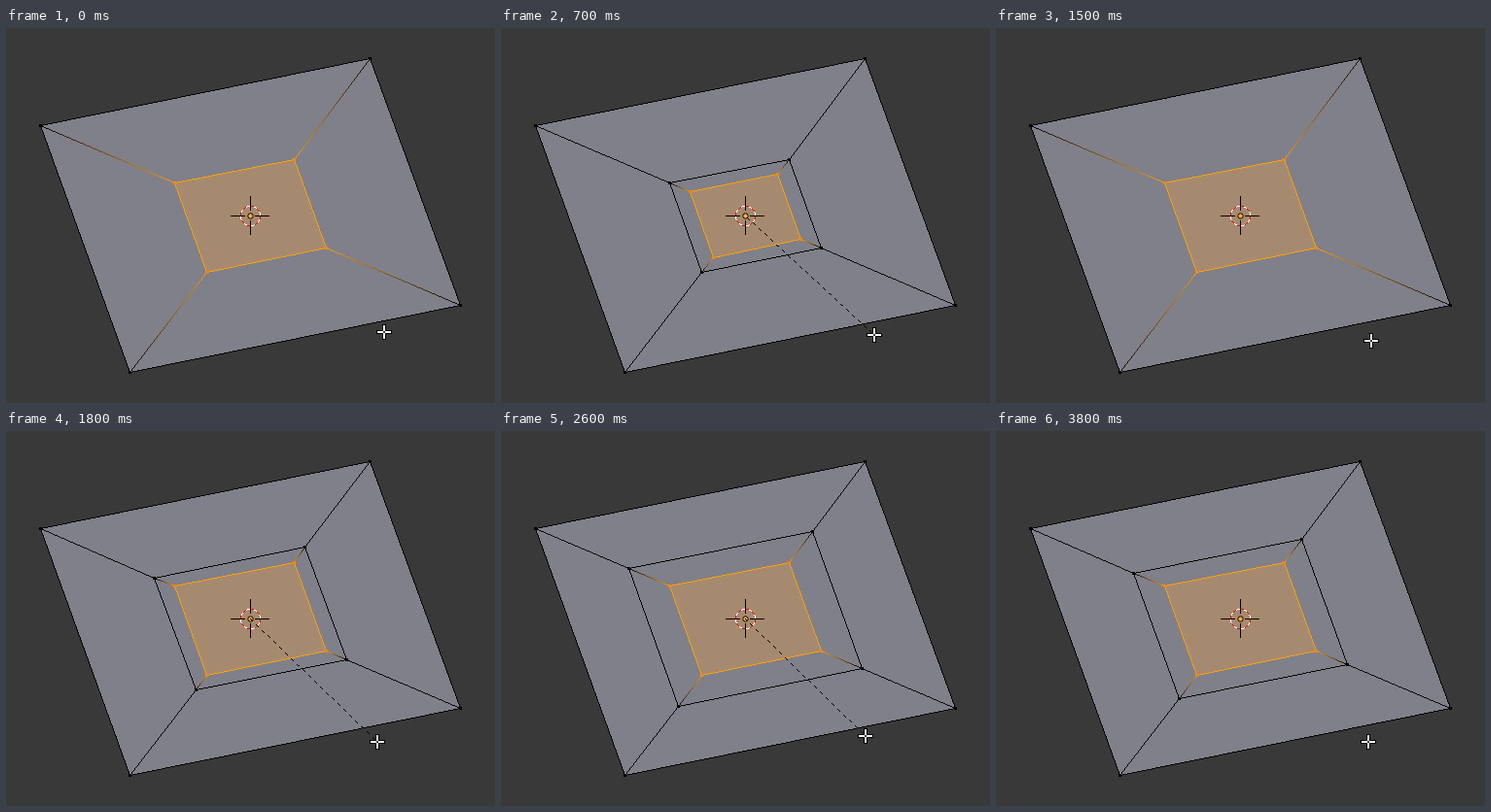
An HTML page with a canvas for the animation above (3900 ms loop, 503 by 386 pixels).

```html
<!DOCTYPE html>
<html lang="en">
<head>
<meta charset="utf-8">
<title>Inset and outset</title>
<style>
  html, body { margin: 0; width: 100%; height: 100%; overflow: hidden; background: #393939; }
  canvas { display: block; }
</style>
</head>
<body>
<canvas id="stage" width="503" height="386"></canvas>
<script>
const ctx = document.getElementById('stage').getContext('2d');
const STEP = 100, STEPS = 39;
const FACE = 0.361;
const CENTER = [251, 193];
const CORNERS = [[-216, -93], [123.3, -161.7], [216, 92], [-123.6, 161]];
const BLACK = [0, 0, 0], EDGE = [255, 160, 0], VERTEX = [255, 133, 0];

// Turning points of the outset drag: step, ring scale.
const TURNS = [[16, FACE], [19, 0.488], [21.5, 0.326], [27, 0.577], [31.5, 0.469], [35, 0.507]];

const mix = (a, b, k) => a.map((v, i) => v + (b[i] - v) * k);
const ease = k => (1 - Math.cos(Math.PI * Math.min(1, k))) / 2;

const insetScale = step => FACE - 0.21 * (1 - (1 - (step - 4) / 9) ** 1.5);

function outsetScale(step) {
  const found = TURNS.findIndex(turn => turn[0] > step);
  const i = found < 0 ? TURNS.length - 1 : found;
  const [t0, a] = TURNS[i - 1], [t1, b] = TURNS[i];
  return a + (b - a) * ease((step - t0) / (t1 - t0));
}

// While dragging, the mouse moves along a line in proportion to the scale.
const insetMouse = s => [384 + 67 * (s - 0.263), 316 + 33 * (s - 0.263)];
const outsetMouse = s => [382 - 69 * (s - 0.4535), 320 - 59 * (s - 0.4535)];

function stateAt(step) {
  const idle = { mid: 1, selected: FACE, dragging: false };
  if (step < 4) {
    return { ...idle, mouse: mix([389, 313], insetMouse(FACE), step / 4) };
  }
  if (step < 13) {
    const s = insetScale(step);
    return { mid: FACE, selected: s, mouse: insetMouse(s), dragging: true };
  }
  if (step < 16) {
    return { ...idle, mouse: mix(insetMouse(insetScale(12)), outsetMouse(FACE), (step - 12) / 4) };
  }
  const s = outsetScale(step);
  const dragging = step < 36;
  const mouse = mix(outsetMouse(s), [383, 320], dragging ? 0 : (step - 36) / 2);
  return { mid: Math.max(FACE, s), selected: FACE, mouse, dragging };
}

const css = c => `rgb(${c.map(Math.round)})`;
const quad = scale => CORNERS.map(corner =>
  corner.map((v, i) => Math.round(CENTER[i] + v * scale)));

// Crisp one-pixel line, optionally blended between two colours or dashed.
function line(a, b, from, to = from, dash = 0) {
  const n = Math.max(Math.abs(b[0] - a[0]), Math.abs(b[1] - a[1])) || 1;
  for (let i = 0; i <= n; i++) {
    if (dash && Math.floor(i / dash) % 2 === 0) continue;
    const [x, y] = mix(a, b, i / n).map(Math.round);
    ctx.fillStyle = css(mix(from, to, i / n));
    ctx.fillRect(x, y, 1, 1);
  }
}

function fillQuad(points, color) {
  ctx.fillStyle = color;
  ctx.beginPath();
  points.forEach(([x, y]) => ctx.lineTo(x + 0.5, y + 0.5));
  ctx.fill();
}

function outline(points, color) {
  points.forEach((p, i) => line(p, points[(i + 1) % 4], color));
}

function dots(points, color) {
  ctx.fillStyle = css(color);
  points.forEach(([x, y]) => ctx.fillRect(x - 1, y - 1, 3, 3));
}

function drawMesh({ mid, selected }) {
  const outer = quad(1), ring = quad(mid), inner = quad(selected);
  fillQuad(outer, '#80808a');
  fillQuad(inner, '#a68a70');
  outline(outer, BLACK);
  if (mid < 1) {
    outer.forEach((p, i) => line(p, ring[i], BLACK));
    outline(ring, BLACK);
    dots(ring, BLACK);
  }
  ring.forEach((p, i) => line(p, inner[i], BLACK, EDGE));
  outline(inner, EDGE);
  dots(outer, BLACK);
  dots(inner, VERTEX);
}

function drawPivot() {
  const [x, y] = CENTER;
  const count = 64;
  for (let i = 0; i < count; i++) {
    const angle = i / count * Math.PI * 2;
    ctx.fillStyle = i % 8 < 4 ? '#f00' : '#fff';
    ctx.fillRect(Math.round(x + 10 * Math.cos(angle)), Math.round(y + 10 * Math.sin(angle)), 1, 1);
  }
  ctx.fillStyle = '#000';
  for (const d of [-20, 5]) {
    ctx.fillRect(x + d, y, 15, 1);
    ctx.fillRect(x, y + d, 1, 15);
  }
  ctx.beginPath();
  ctx.arc(x + 0.5, y + 0.5, 2.7, 0, Math.PI * 2);
  ctx.fillStyle = '#ffaa40';
  ctx.fill();
  ctx.lineWidth = 1;
  ctx.strokeStyle = '#000';
  ctx.stroke();
}

function cross([x, y], color, gap, reach, half) {
  ctx.fillStyle = color;
  for (const d of [-reach, gap]) {
    ctx.fillRect(x + d, y - half, reach - gap, half * 2);
    ctx.fillRect(x - half, y + d, half * 2, reach - gap);
  }
}

function draw(step) {
  const state = stateAt(step);
  const mouse = state.mouse.map(Math.round);
  ctx.fillStyle = '#393939';
  ctx.fillRect(0, 0, 503, 386);
  drawMesh(state);
  drawPivot();
  if (state.dragging) line(mouse, CENTER, BLACK, BLACK, 3);
  cross(mouse, '#000', 1, 8, 2);
  cross(mouse, '#fff', 1, 7, 1);
}

const start = performance.now();
function tick() {
  draw(Math.floor((performance.now() - start) / STEP) % STEPS);
  requestAnimationFrame(tick);
}
tick();
</script>
</body>
</html>
```
